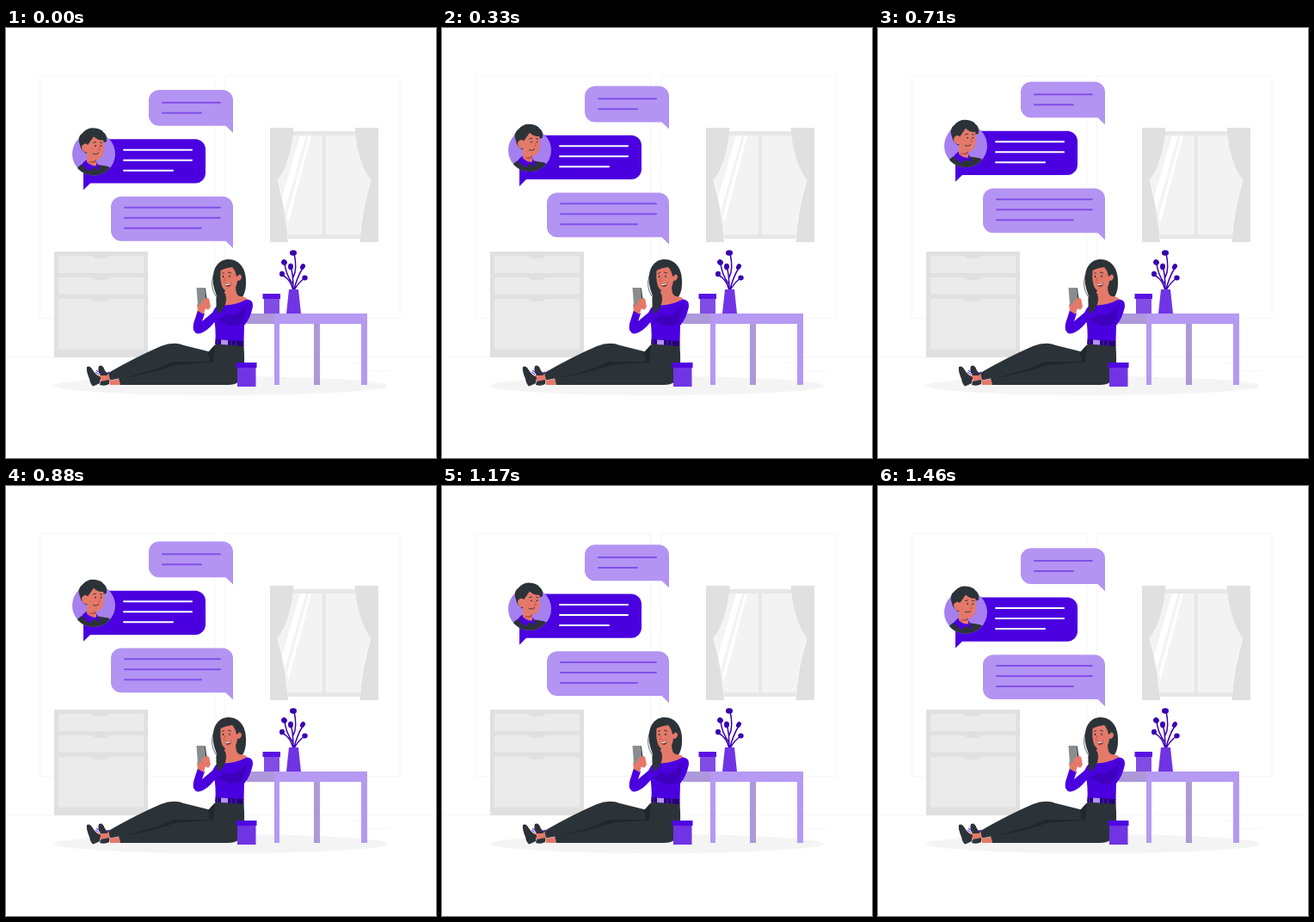
Write an HTML page that moves like this. It is 500 px wide and 500 px high and loops after 1.5 s.

```html
<!DOCTYPE html>
<html lang="en">
<head>
<meta charset="utf-8">
<title>Chatting at home</title>
<style>
  html, body { margin: 0; width: 100%; height: 100%; overflow: hidden; background: #fff; }
  svg { display: block; width: 100%; height: 100%; }
  .line { fill: none; stroke-width: 2; stroke-linecap: round; }
  .dark { fill: #2c3338; }
  .skin { fill: #e4796a; }
  .main { fill: #4b00e0; }
  .lilac { fill: #b394f2; }
  .leaf { fill: #3a00b0; }
</style>
</head>
<body>
<svg viewBox="0 0 500 500">
  <defs>
    <clipPath id="disc"><path d="M70 100H135V146.500H127A25 25 0 0 1 77 146.500H70Z"/></clipPath>
  </defs>

  <!-- room -->
  <g fill="none" stroke="#f6f6f6">
    <rect x="39.500" y="55.500" width="203" height="282"/>
    <rect x="254.500" y="55.500" width="203.500" height="282"/>
    <path d="M0 382.500H500M400 389.500H420M413 398.500H447"/>
  </g>

  <!-- cabinet -->
  <rect x="56" y="260" width="109" height="123" fill="#e0e0e0"/>
  <g fill="#ebebeb">
    <rect x="61" y="265" width="99" height="20"/>
    <rect x="61" y="290" width="99" height="19.500"/>
    <rect x="61" y="315" width="99" height="58.500"/>
  </g>
  <g fill="#e0e0e0">
    <path id="grip" d="M100 265Q102 268 106 268H115Q118 268 120.500 265Z"/>
    <use href="#grip" y="25"/>
    <use href="#grip" y="50"/>
  </g>

  <!-- window -->
  <path d="M328 120H412Q414 155 424 177Q415 210 412 245H328Q325 210 316 177Q328 155 328 120Z" fill="#f3f3f3"/>
  <path d="M342 125H349L324 213L320 200ZM352 125H355L328.500 226L326.500 219Z" fill="#fff"/>
  <path d="M328 120H412V125H328ZM326 240H413V245H326ZM368 125H372V240H368Z" fill="#e7e7e7"/>
  <path d="M316 177Q325 207 327 240L329 249L320 240ZM424 177Q414 207 412 240L411 249L420 240Z" fill="#fff"/>
  <g fill="#e0e0e0">
    <path d="M307 116H334.500Q331 157 315.500 177Q325 210 328 249H307Z"/>
    <path d="M433 116H405.500Q409 157 424.500 177Q414 210 411.500 249H433Z"/>
  </g>

  <ellipse cx="250" cy="416" rx="194" ry="11" fill="#f4f4f4"/>

  <!-- table -->
  <path d="M280 332H312V344H280ZM358 344H365V415H358Z" fill="#ad98d9"/>
  <path d="M312 332H420V415H413V344H318V415H312Z" fill="#b599f3"/>
  <path d="M300 314H318V332H300Z" fill="#814ce6"/>
  <path d="M298.500 309H319V315H298.500Z" fill="#5a12e0"/>

  <!-- plant -->
  <g fill="none" stroke="#3a00b0" stroke-width="1.500" stroke-linecap="round">
    <path d="M334 305Q334 285 331 278M334 305Q331 292 321 287M333 297Q325 286 324 273M334 290Q339 280 335 262M335 304Q338 291 345 279M335 305Q339 297 347 291"/>
  </g>
  <g class="leaf">
    <ellipse cx="334" cy="261.500" rx="4" ry="3.300"/>
    <ellipse cx="323.500" cy="272.500" rx="3.500" ry="3.200" transform="rotate(40 323.500 272.500)"/>
    <ellipse cx="331" cy="277.500" rx="3" ry="3.700"/>
    <ellipse cx="345" cy="277.500" rx="2.700" ry="3.600" transform="rotate(30 345 277.500)"/>
    <ellipse cx="321" cy="286" rx="3" ry="3.200"/>
    <ellipse cx="347.500" cy="290.500" rx="3.200" ry="3"/>
  </g>
  <path d="M329 304H340L343 332H326Z" fill="#7034e5"/>

  <!-- legs and shoes -->
  <path class="skin" d="M107 404L119 401L121 409L111 412ZM120 410L131 408L133 415H121Z"/>
  <path class="dark" d="M94 394Q98 392 101 398Q105 404 110 406L109 413Q105 415 101 416.500Q98 414 97 408Q93 399 94 394ZM108 393Q112 391 114 396Q116 402 120 401L117 404L110 404Q106 399 108 393ZM110 411L120 409V414Q115 417 109 415Z"/>
  <path d="M104 400L108 403M105 398L109 401M116 402L120 400" stroke="#4b00e0" fill="none"/>
  <path class="dark" d="M119 401Q150 383 180 370Q195 364 207 369L239 377L244 367L276.500 369Q278 391 276 403Q273 415 258 415H133L131 407.500L121 409.500Z"/>
  <path d="M131 407.500Q170 400 194 388Q213 388 237 388L235 377L243 368L241 389Q214 390 197 392Q165 403 131 407.500Z" fill="#20272b"/>

  <!-- hair behind -->
  <path class="dark" d="M241 298C239 279 247 269 259 269C272 269 280 281 279 297C279 308 275 315 268 320H250Q243 310 241 298Z"/>
  <path d="M241 288Q237 301 244 312" fill="none" stroke="#2c3338" stroke-width=".7"/>

  <!-- torso -->
  <path class="skin" d="M255 305L267 300Q267 311 272 312Q281 312 281 318L262 328L247 324Z"/>
  <path class="main" d="M246 322Q264 324 280 315.500Q288 316 287 324Q284 338 277 346L276.500 365L243.500 363Q244 350 242.500 342Q233 354 224 355.500Q216 355 218 344L223 328L231 332L228 341L240 331Q243 325 246 322Z"/>
  <path d="M253 332Q267 341 281 319Q278 335 275 343Q262 352 244 338Q253 339 253 332Z" fill="#3f00bd"/>
  <path d="M243.500 362L276.500 364V370L243 367.500Z" fill="#270078"/>
  <path d="M250 362.500L258 363V368.500L250 368Z" fill="#b394f2"/>
  <path d="M246 362.500V367.500M262 363.500V369M267 364V369" stroke="#5d1ee0"/>

  <!-- hand and phone -->
  <path class="skin" d="M223 329L222 322L227 317Q232 312 236 315L238 324L235 328L232 325L230 333Z"/>
  <path d="M221.500 302H231L233 321L223 322.500Z" fill="#8a8d90"/>
  <path d="M231 302L232 303L234 320L232.500 321Z" fill="#30363b"/>
  <path class="skin" d="M226 322L229 316Q232 313 236 315L237 325L232 327L229 325Z"/>

  <!-- face -->
  <path class="skin" d="M250 279Q254 276 264 276Q269 279 269 287Q274 285 274 290Q273 294 269 294Q268 304 261 306.500Q254 307 251 300Q248 290 250 279Z"/>
  <path class="dark" d="M248 288Q247 276 257 273Q268 273 271 287L268 289Q267 282 263 278Q255 279 249 282Z"/>
  <path class="dark" d="M245 308Q250 304 255 309Q259 321 247 333Q243 323 245 308Z"/>
  <path d="M251 286L254 284M258 284L262 285" fill="none" stroke="#2c3338" stroke-width=".9"/>
  <g class="dark">
    <ellipse cx="252.500" cy="289" rx=".8" ry="1.200"/>
    <ellipse cx="260" cy="288.700" rx=".8" ry="1.200"/>
  </g>
  <path d="M255 290L253 294.500L255.500 295" fill="none" stroke="#bb5149" stroke-width=".8"/>
  <path d="M254.500 297.500Q259 298.500 262 295.500Q262 300.500 258 301Q255 300.500 254.500 297.500Z" fill="#742c2d"/>
  <path d="M255 297.800Q259 298.500 261.500 296.200L261 298Q258 299.500 255.500 299Z" fill="#fff"/>

  <!-- floor pot -->
  <path d="M269 394H290.500V417H269Z" fill="#7034e5"/>
  <path d="M267.500 389H291.500V395H267.500Z" fill="#5006e0"/>

  <!-- chat -->
  <g id="chat">
    <path class="lilac" d="M178 72H252A12 12 0 0 1 264 84V122L255.500 113.800H178A12 12 0 0 1 166 101.800V84A12 12 0 0 1 178 72Z"/>
    <path class="line" stroke="#824fe9" d="M182 86.700H249M182 98.700H227"/>

    <path class="main" d="M102 129.200H220A12 12 0 0 1 232 141.200V168.500A12 12 0 0 1 220 180.500H98L90 188.300V141.200A12 12 0 0 1 102 129.200Z"/>
    <path class="line" stroke="#fff" d="M137 141.700H216M137 153.700H216M137 165.700H194"/>

    <path class="lilac" d="M134 196H252A12 12 0 0 1 264 208V256L255.500 247.700H134A12 12 0 0 1 122 235.700V208A12 12 0 0 1 134 196Z"/>
    <path class="line" stroke="#824fe9" d="M138 208.700H249M138 220.700H249M138 232.700H227"/>

    <circle cx="102" cy="146.500" r="25" fill="#a680ee"/>
    <g clip-path="url(#disc)">
      <path class="dark" d="M82 164Q86 158 93 157L107 159L119 161Q124 164 121 172H82Z"/>
      <path class="main" d="M88 159Q91 154 95 153L106 157L109 166L102 162L97 167Z"/>
      <path class="skin" d="M94 144L105 151V160Q100 161 94 156Z"/>
      <path class="dark" d="M86 136Q82 127 89 122Q95 115 104 116.500Q112 118 113 121Q118 124 117 132L112 134L93 146Q87 142 86 136Z"/>
      <path class="skin" d="M95 135Q97 129 102 126Q107 131 113 129Q115 138 113 146Q111 153 105 153.500Q98 152 95 145Q88 145 88 138Q90 133 95 135Z"/>
      <path class="dark" d="M95 136Q98 132 102 126Q108 132 115 130L113 124L99 122L91 131Z"/>
      <path d="M101 133.500L105 132.500M109 133L112 133.500M101 146Q105 148 108 145" fill="none" stroke="#2c3338" stroke-width=".9"/>
      <circle class="dark" cx="104" cy="137" r=".9"/>
      <circle class="dark" cx="110.500" cy="137" r=".9"/>
      <path d="M108 138L109.500 142L107 142.500" fill="none" stroke="#bb5149" stroke-width=".8"/>
      <path d="M94 155Q100 156 105 153V156Q99 158 94 155Z" fill="#bb5149"/>
    </g>
  </g>
</svg>
<script>
  const LOOP = 1500, LEAD = 28, RISE = 10, REST = 0.37;
  const chat = document.getElementById("chat");

  function draw(ms) {
    const p = ((ms + LEAD) % LOOP) / LOOP;
    const lift = RISE * (1 - Math.abs(1 - 2 * p));
    chat.setAttribute("transform", `translate(0 ${(REST - lift).toFixed(3)})`);
  }

  let start;
  function tick(now) {
    start ??= now;
    draw(now - start);
    requestAnimationFrame(tick);
  }
  draw(0);
  requestAnimationFrame(tick);
</script>
</body>
</html>
```
